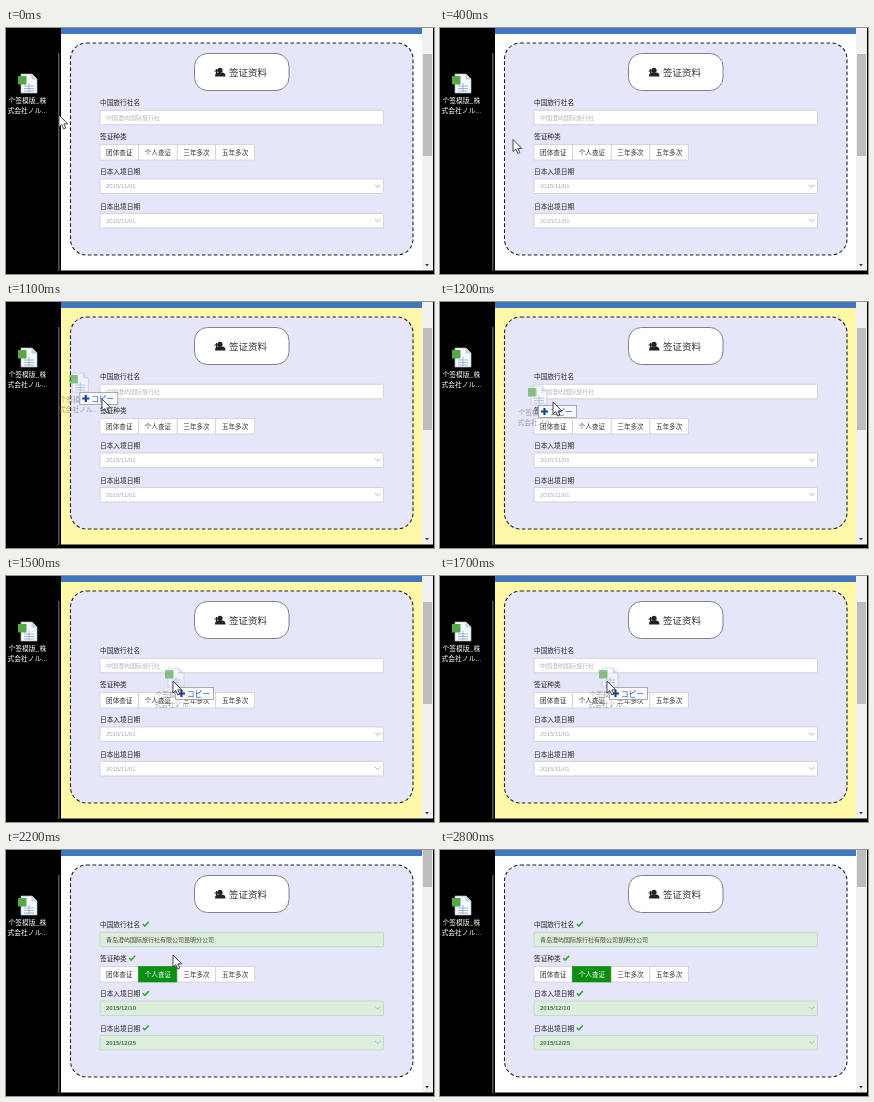
These frames come from a looping animation (428x246 px, 2900 ms). An HTML page:

```html
<!DOCTYPE html>
<html>
<head>
<meta charset="utf-8">
<style>
  html, body { margin: 0; width: 100%; height: 100%; overflow: hidden; background: #000; }
  svg { display: block; width: 428px; height: 246px; }
  text { font-family: "Noto Sans CJK SC", "Noto Sans CJK", sans-serif; dominant-baseline: central; fill: #333; }
  .date { font-family: "Liberation Sans", Arial, sans-serif; }
  .mid { text-anchor: middle; }
</style>
</head>
<body>
<svg viewBox="0 0 428 246">
  <defs>
    <g id="file">
      <path d="M15 46H26L31 51V65H15Z" fill="#f6f9fd" stroke="#a9b8cc" stroke-width=".7"/>
      <path d="M26 46V51H31" fill="#cfdcec" stroke="#a9b8cc" stroke-width=".6"/>
      <path d="M18 58H28M18 60.5H28M18 63H28M23 55V64" stroke="#7d9cc8" stroke-width=".7"/>
      <rect x="12" y="48" width="8.5" height="8.5" fill="#55a845"/>
    </g>
  </defs>

  <rect x="52" y="25" width="1.5" height="218" fill="#555"/>
  <rect id="page" x="55" width="361" height="242.5"/>
  <rect x="55" width="361" height="6" fill="#4076c0"/>
  <rect x="416" width="11" height="242.5" fill="#f1f1f1"/>
  <rect id="thumb" x="417" width="9"/>
  <path d="M419 236H423L421 238.5Z" fill="#444"/>

  <rect x="64.5" y="15" width="342.5" height="212" rx="16" fill="#e6e6fa" stroke="#222" stroke-width="1.1" stroke-dasharray="3.6 2.4"/>
  <rect x="188.5" y="25.5" width="94.5" height="37" rx="13" fill="#fff" stroke="#777" stroke-width=".9"/>
  <g fill="#222">
    <circle cx="214" cy="42.3" r="2.6"/>
    <path d="M209 48.5Q209 44.7 212 44.6H216Q219.5 44.7 219.5 48.5Z"/>
    <path d="M208.5 43H212.5M210.5 41V45" stroke="#222" stroke-width="1.2"/>
  </g>
  <text x="223" y="44" font-size="9.5">签证资料</text>

  <g id="empty"></g>
  <g id="filled"></g>

  <rect id="hover" x=".5" y="44.5" width="42" height="43" rx="2" fill="#6a9bd8" fill-opacity=".25" stroke="#8db4e2" stroke-opacity=".6"/>
  <use href="#file"/>
  <g class="caption" font-size="6.8"></g>

  <g id="drag">
    <g id="ghost" opacity=".65">
      <use href="#file"/>
      <g class="caption" font-size="6.8"></g>
    </g>
    <g id="tip">
      <rect x="2.5" y="6.5" width="38" height="12" fill="#f8f9fd" stroke="#999" stroke-width=".8"/>
      <path d="M5 12.5H12M8.5 9V16" stroke="#17459c" stroke-width="2.2"/>
      <text x="14" y="12.5" font-size="7.6" style="fill:#2a55b0">コピー</text>
    </g>
  </g>
  <path id="cursor" d="M0 0V12L2.8 9.6L4.8 14L6.8 13.1L4.9 8.9H8.8Z" fill="#f8f8ff" stroke="#222" stroke-width=".8"/>
</svg>

<script>
const $ = id => document.getElementById(id);
const LOOP = 2900, STEP = 100;
const GRIP = [20, 59];   // where the pointer holds the file icon

const label = (y, s, done) =>
  `<text x="94" y="${y}" font-size="6.7" font-weight="500" style="fill:#222">${s}</text>` +
  (done ? `<path d="M${96 + s.length * 6.8} ${y}l2 2l4 -4.2" fill="none" stroke="#36a336" stroke-width="1.6"/>` : '');

const box = (y, done) =>
  `<rect x="94" y="${y}" width="283.5" height="14.5" rx="1" stroke-width=".8"
    fill="${done ? '#dbefdc' : '#fff'}" stroke="${done ? '#bcd6be' : '#ccc'}"/>`;

const dateRow = (y, name, date, done) => label(y, name, done) + box(y + 7.7, done) +
  `<text class="date" x="100" y="${y + 15}" font-size="6" ${done ? 'font-weight="bold"' : ''}
    style="fill:${done ? '#4b7550' : '#aaa'}">${date}</text>
  <path d="M369 ${y + 13.3}l2.7 2.7l2.7 -2.7" fill="none" stroke="#aab4c0"/>`;

const kindButton = (name, i, on) =>
  `<rect x="${94 + i * 38.6}" y="116.5" width="38.6" height="15.5" stroke-width=".7"
    fill="${on ? '#0b8f12' : '#fff'}" stroke="${on ? '#0b8f12' : '#ccc'}"/>
  <text class="mid" x="${113.3 + i * 38.6}" y="124" font-size="6.6" style="fill:${on ? '#fff' : '#333'}">${name}</text>`;

const form = (agency, dateIn, dateOut, done) =>
  label(74, '中国旅行社名', done) + box(82.3, done) +
  `<text x="100" y="89.5" font-size="6" style="fill:${done ? '#444' : '#b4b4b4'}">${agency}</text>` +
  label(108, '签证种类', done) +
  ['团体查证', '个人查证', '三年多次', '五年多次'].map((s, i) => kindButton(s, i, done && i === 1)).join('') +
  dateRow(143.3, '日本入境日期', dateIn, done) +
  dateRow(177.7, '日本出境日期', dateOut, done);

$('empty').innerHTML = form('中国澄屿国际旅行社', '2015/11/01', '2015/11/01', false);
$('filled').innerHTML = form('青岛澄屿国际旅行社有限公司昆明分公司', '2015/12/10', '2015/12/25', true);

document.querySelectorAll('.caption').forEach((g, i) => {
  const color = i ? '#77777f' : '#fff';
  g.innerHTML = ['个签模版_株', '式会社ノル...'].map((s, row) =>
    `<text class="mid" x="21.3" y="${72 + row * 10}" style="fill:${color}">${s}</text>`).join('');
});

// time, x, y of the pointer tip
const path = [
  [0, 53, 87], [200, 124, 165], [600, 22, 58], [800, 22, 58], [1100, 96, 97], [1200, 113, 100],
  [1400, 167, 105], [2400, 167, 105], [2700, 258, 232], [2800, 263, 262]
];

function pointer(t) {
  const i = Math.max(1, path.findIndex(k => k[0] >= t));
  const [t0, x0, y0] = path[i - 1], [t1, x1, y1] = path[i];
  const p = (t - t0) / (t1 - t0);
  return [x0 + (x1 - x0) * p, y0 + (y1 - y0) * p];
}

const show = (id, on) => $(id).style.display = on ? '' : 'none';
const move = (id, x, y) => $(id).setAttribute('transform', `translate(${x} ${y})`);

function draw(now) {
  const t = Math.floor(now % LOOP / STEP) * STEP;
  const done = t >= 2200;
  show('empty', !done);
  show('filled', done);
  show('hover', t >= 500 && t < 800);
  show('drag', t >= 900 && t < 1800);
  show('cursor', t < 700 || t >= 900);
  $('page').setAttribute('fill', t >= 1000 && !done ? '#fff8a8' : '#fff');

  const thumb = $('thumb');
  thumb.setAttribute('y', done ? 0 : 26);
  thumb.setAttribute('height', done ? 37 : 102);
  thumb.setAttribute('fill', '#bdbdbd');

  move('cursor', ...pointer(t));
  const [x, y] = pointer(Math.max(0, t - STEP));   // dragged copy trails one step behind
  move('ghost', x - GRIP[0], y - GRIP[1]);
  move('tip', x, y);
  requestAnimationFrame(loop);
}

const start = performance.now();
const loop = () => draw(performance.now() - start);
loop();
</script>
</body>
</html>
```
